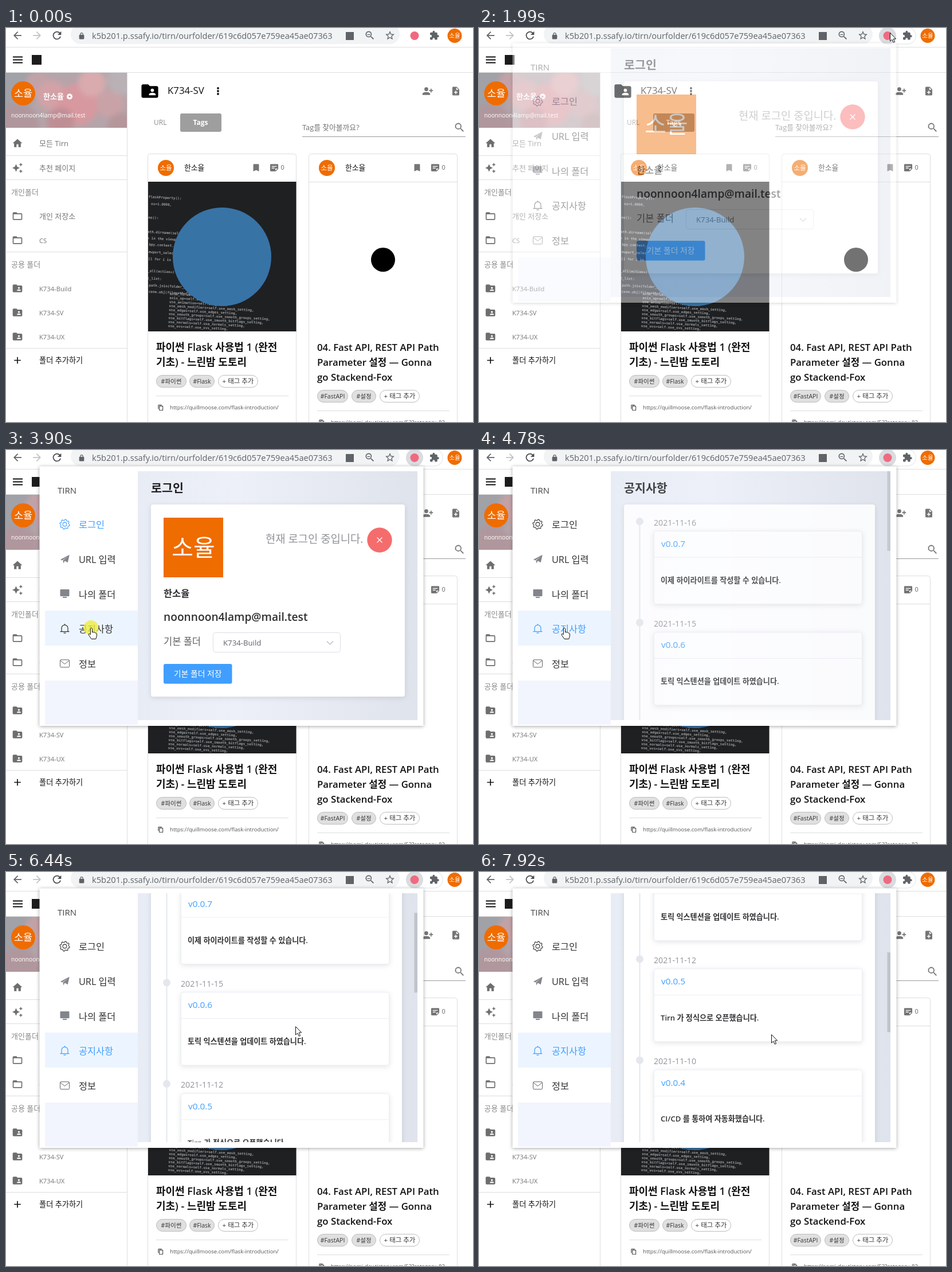
Animation of 815 by 687 pixels, one loop 7.99 s. Source, as an HTML page:

```html
<!DOCTYPE html>
<html lang="ko">
<head>
<meta charset="utf-8">
<title>Bookmark extension demo</title>
<style>
html, body { margin: 0; width: 100%; height: 100%; overflow: hidden; background: #fff; }
svg { display: block; }
text { font-family: "Open Sans", "Noto Sans CJK KR", "Noto Sans CJK", sans-serif; white-space: pre; }
.code text { font-family: "DejaVu Sans Mono", monospace; }
.soft { filter: blur(5px); }
.shadow { filter: drop-shadow(0 2px 5px rgba(0,0,0,.11)); }
.popup-shadow { filter: drop-shadow(0 1px 3px rgba(0,0,0,.35)); }

@property --scroll { syntax: "<number>"; inherits: true; initial-value: 0; }
.a { animation: 7990ms step-end infinite; }
#cursor { animation-name: cursor; }
#arrow { animation-name: arrow; }
#hand { animation-name: hand; }
#pill { animation-name: pill; }
#popup { animation-name: popup; }
#row { animation-name: row; }
#click { animation-name: click; }
#item0 { animation-name: deselect; }
#item3 { animation-name: select; }
#login { animation-name: leave; }
#notice { animation-name: enter; }
#scroller { animation-name: scroll; }
#content { transform: translateY(calc(var(--scroll) * -1px)); }
#thumb { transform: translateY(calc(var(--scroll) * .317px)); }

@keyframes cursor {
  0% { opacity: 0; transform: translate(782px, 2px); }
  13.14% { opacity: 1; transform: translate(782px, 2px); animation-timing-function: steps(11); }
  22.4% { opacity: 1; transform: translate(717px, 8px); }
  26.03% { opacity: 1; transform: translate(717px, 8px); animation-timing-function: steps(8); }
  32.79% { opacity: 1; transform: translate(322px, 255px); animation-timing-function: steps(6); }
  37.92% { opacity: 1; transform: translate(149px, 312px); }
  40.55% { opacity: 1; transform: translate(149px, 310px); }
  59.83% { opacity: 1; transform: translate(149px, 310px); animation-timing-function: steps(4); }
  63.2% { opacity: 1; transform: translate(414px, 281px); animation-timing-function: steps(2); }
  64.83% { opacity: 1; transform: translate(504px, 271px); }
  68.2% { opacity: 1; transform: translate(505px, 269px); }
  83.85% { opacity: 1; transform: translate(506px, 269px); }
  88.1% { opacity: 1; transform: translate(508px, 269px); }
  92.49% { opacity: 1; transform: translate(509px, 272px); }
  94.99% { opacity: 1; transform: translate(510px, 279px); }
  99.12%, 100% { opacity: 1; transform: translate(510px, 283px); }
}
@keyframes arrow { 0%, 61.51%, 100% { opacity: 1; } 36.3% { opacity: 0; } }
@keyframes hand { 0%, 61.51%, 100% { opacity: 0; } 36.3% { opacity: 1; } }
@keyframes pill { 0% { opacity: 0; } 20.65%, 100% { opacity: 1; } }
@keyframes popup {
  0% { opacity: 0; transform: translateY(-4px); }
  23.15% { opacity: .08; transform: translateY(-4px); }
  24.03% { opacity: .25; transform: translateY(-3px); }
  24.9% { opacity: .45; transform: translateY(-2px); }
  26.03% { opacity: .8; transform: translateY(-1px); }
  26.91%, 100% { opacity: 1; transform: none; }
}
@keyframes row { 0% { opacity: 0; } 36.3%, 100% { opacity: 1; } }
@keyframes click { 0%, 53.81%, 100% { opacity: 0; } 48.81% { opacity: 1; } }
@keyframes deselect {
  0% { color: #506987; }
  26.03% { color: #409eff; }
  53.81% { color: #409eff; animation-timing-function: steps(4, start); }
  57.2%, 100% { color: #303133; }
}
@keyframes select {
  0% { color: #303133; }
  53.81% { color: #303133; animation-timing-function: steps(4, start); }
  57.2%, 100% { color: #409eff; }
}
@keyframes leave {
  0% { opacity: 1; }
  53.81% { opacity: 1; animation-timing-function: steps(4, start); }
  57.2%, 100% { opacity: 0; }
}
@keyframes enter {
  0% { opacity: 0; }
  55.44% { opacity: 0; animation-timing-function: steps(6); }
  60.58%, 100% { opacity: 1; }
}
@keyframes scroll {
  0% { --scroll: 0; }
  78.09% { --scroll: 1; animation-timing-function: steps(3); }
  80.6% { --scroll: 108; }
  83.85% { --scroll: 111; animation-timing-function: steps(5); }
  88.1% { --scroll: 217; }
  92.49% { --scroll: 221; animation-timing-function: steps(3); }
  94.99%, 100% { --scroll: 325.5; }
}
</style>
</head>
<body>
<svg id="stage" width="815" height="687" viewBox="0 0 815 687"></svg>
<script>
const ORANGE = '#ef6c00', BLUE = '#409eff', GREY = '#757575', RULE = '#dedede';
const NICK = '소율', NAME = '한소율', MAIL = 'noonnoon4lamp@mail.test', APP = 'Tirn';

// Icon outlines on a 24-unit grid
const icons = {
  back: 'M20 11H7.8l5.6-5.6L12 4l-8 8 8 8 1.4-1.4L7.8 13H20z',
  reload: 'M17.65 6.35A8 8 0 1019.7 14h-2.1A6 6 0 1116.2 7.8L13 11h7V4z',
  lock: 'M18 8h-1V6A5 5 0 007 6v2H6q-2 0-2 2v10q0 2 2 2h12q2 0 2-2V10q0-2-2-2zM9 8V6a3 3 0 016 0v2z',
  search: 'M15.5 14h-.8l-.3-.3A6.5 6.5 0 109.5 16q2.4 0 4.2-1.6l.3.3v.8l5 5 1.5-1.5zM9.5 14a4.5 4.5 0 110-9 4.5 4.5 0 010 9z',
  star: 'M22 9.2l-7.2-.6L12 2 9.2 8.6 2 9.2 7.5 14 5.8 21 12 17.3 18.2 21l-1.6-7zM12 15.4l-3.8 2.3 1-4.3-3.3-2.9 4.4-.4L12 6.1l1.7 4 4.4.4-3.3 2.9 1 4.3z',
  puzzle: 'M20.5 11H19V7q0-2-2-2h-4V3.5a2.5 2.5 0 00-5 0V5H4Q2 5 2 7v3.8h1.5a2.7 2.7 0 010 5.4H2V20q0 2 2 2h3.8v-1.5a2.7 2.7 0 015.4 0V22H17q2 0 2-2v-4h1.5a2.5 2.5 0 000-5z',
  home: 'M10 20v-6h4v6h5v-8h3L12 3 2 12h3v8z',
  sparkle: 'M19 9l1.2-2.8L23 5l-2.8-1.2L19 1l-1.2 2.8L15 5l2.8 1.2zM19 15l-1.2 2.8L15 19l2.8 1.2L19 23l1.2-2.8L23 19l-2.8-1.2zM11.5 9.5L9 4 6.5 9.5 1 12l5.5 2.5L9 20l2.5-5.5L17 12z',
  folder: 'M20 6h-8l-2-2H4Q2 4 2 6v12q0 2 2 2h16q2 0 2-2V8q0-2-2-2zM20 18H4V8h16z',
  shared: 'M20 6h-8l-2-2H4Q2 4 2 6v12q0 2 2 2h16q2 0 2-2V8q0-2-2-2zM15 9a2 2 0 110 4 2 2 0 010-4zM19 17h-8v-1q0-2 4-2t4 2z',
  plus: 'M19 13h-6v6h-2v-6H5v-2h6V5h2v6h6z',
  addUser: 'M9 12a4 4 0 100-8 4 4 0 000 8zM18 10V7h2v3h3v2h-3v3h-2v-3h-3v-2zM9 14q-8 .5-8 4v2h16v-2q0-3.5-8-4z',
  addFile: 'M14 2H6Q4 2 4 4v16q0 2 2 2h12q2 0 2-2V8zM16 16h-3v3h-2v-3H8v-2h3v-3h2v3h3zM13 9V3.5L18.5 9z',
  bookmark: 'M17 3H7Q5 3 5 5v16l7-3 7 3V5q0-2-2-2z',
  note: 'M4 3h16q2 0 2 2v10l-6 6H4q-2 0-2-2V5q0-2 2-2zM6 8v2h12V8zM6 12v2h7v-2zM15 19.5l5.5-5.5H15z',
  copy: 'M16 1H4Q2 1 2 3v14h2V3h12zM19 5H8Q6 5 6 7v14q0 2 2 2h11q2 0 2-2V7q0-2-2-2zM19 21H8V7h11z',
  send: 'M2 13L23 2l-4 18-7-4-3 6-1-7 11-9-13 9z'
};
const icon = (name, cx, cy, size, fill = GREY) => `<path fill="${fill}" fill-rule="evenodd"
  transform="translate(${cx - size / 2} ${cy - size / 2}) scale(${size / 24})" d="${icons[name]}"/>`;
// cy is the optical middle of the line
const text = (x, cy, size, str, fill = '#111', more = '') =>
  `<text x="${x}" y="${cy + size * .36}" font-size="${size}" fill="${fill}" ${more}>${str}</text>`;
const rect = (x, y, w, h, fill, more = '') =>
  `<rect x="${x}" y="${y}" width="${w}" height="${h}" fill="${fill}" ${more}/>`;
const circle = (cx, cy, r, fill, more = '') => `<circle cx="${cx}" cy="${cy}" r="${r}" fill="${fill}" ${more}/>`;
const line = (d, stroke = RULE, width = 1) => `<path d="${d}" fill="none" stroke="${stroke}" stroke-width="${width}"/>`;
const BOLD = 'font-weight="600"', MID = 'text-anchor="middle"';
const avatar = (cx, cy, r, size) => circle(cx, cy, r, ORANGE) + text(cx, cy, size, NICK, '#fff', MID);

// Outline of a cog with rounded teeth
function cog(cx, cy, r, teeth) {
  const points = Array.from({ length: teeth * 4 }, (_, i) => {
    const angle = (i + .5) * Math.PI / (teeth * 2), reach = i % 4 < 2 ? r : r * .8;
    return (cx + reach * Math.sin(angle)).toFixed(2) + ' ' + (cy - reach * Math.cos(angle)).toFixed(2);
  });
  return `M${points.join('L')}z`;
}

const toolbar = () => rect(0, 0, 815, 33, '#fff') + rect(113, -6, 574, 34, '#f1f3f4', 'rx="17"') + line('M0 33.5H815') +
  icon('back', 20, 13, 21, '#5f6368') +
  `<g transform="matrix(-1 0 0 1 108 0)">${icon('back', 54, 13, 21, '#c0c3c6')}</g>` +
  icon('reload', 89, 13, 22, '#4a4d51') + icon('lock', 132, 14, 13, '#5f6368') +
  text(150, 14, 14.6, 'k5b201.p.ssafy.io/tirn/ourfolder/619c6d057e759ea45ae07363', '#5f6368') +
  rect(593, 7, 14, 14, '#5f6368') + icon('search', 635, 13, 20, '#5f6368') + line('M630.5 11.5h5', '#5f6368', 1.3) +
  icon('star', 670, 13, 19, '#5f6368') +
  `<g id="pill" class="a">${rect(698.5, -1, 64, 29, '#fff', 'rx="14.5" stroke="#dfe1e5"')}${circle(713, 13.5, 15, '#dadce0')}</g>` +
  circle(713, 13.5, 7.5, '#ee6a80') + icon('puzzle', 747.5, 13, 18, '#5f6368') + avatar(783, 13.5, 12.5, 10.5);

const header = () => line('M12 50.5H29M12 55.5H29M12 60.5H29', '#111', 2) +
  rect(45, 47, 17, 17, '#1c1c1c') + line('M0 77.5H815');

const photo = () => `<svg x="0" y="78" width="211" height="96">${rect(0, 0, 211, 96, '#b5a5aa')}
  <g class="soft">${[[15, 25, 42, '#a1a1a8'], [55, 20, 22, '#c2a2a7'], [20, 92, 38, '#b0979d'], [80, 40, 26, '#d2a2a7'],
    [125, 55, 36, '#d8989f'], [95, 85, 24, '#bf8e95'], [150, 18, 24, '#d9abae'], [182, 55, 24, '#c9a2a7'], [205, 12, 28, '#b9b1b5'],
    [200, 92, 22, '#b5969b']].map(([x, y, r, fill]) => circle(x, y, r, fill)).join('')}</g></svg>` +
  avatar(30, 114, 21, 17.5) + text(65, 119, 13, NAME, '#fff', BOLD) +
  `<path d="${cog(111, 119.5, 5.5, 8)}" fill="#fff"/>` + circle(111, 119.5, 1.8, '#cf9ba1') + text(9, 152, 10.2, MAIL, '#fff');

const sidebar = () => photo() + line('M211.5 78V687M0 222.5H211M0 264.5H211M0 390.5H211M0 558.5H211') +
  [['home', 201, '모든 ' + APP], ['sparkle', 244, '추천 페이지'], ['folder', 328, '개인 저장소'], ['folder', 370, 'CS'],
   ['shared', 454, 'K734-Build'], ['shared', 496, 'K734-SV'], ['shared', 538, 'K734-UX']]
    .map(([name, y, label]) => icon(name, 20, y, 20, '#6e6e6e') +
      text(58, y + .5, /^[A-Z]/.test(label) ? 11.2 : 13, label, GREY)).join('') +
  text(9, 286, 13, '개인폴더', '#8a8a8a') + text(9, 412, 13, '공용 폴더', '#8a8a8a') +
  icon('plus', 20, 579.5, 20, '#111') + text(58, 579.5, 13.2, '폴더 추가하기');

const folderBar = () => icon('shared', 251, 110, 35, '#000') + text(282, 109, 16.8, 'K734-SV', '#111', 'font-weight="500"') +
  [105, 110, 115].map(y => circle(370, y, 1.9, '#111')).join('') +
  icon('addUser', 736, 110, 20) + icon('addFile', 785, 110, 18) +
  text(258, 165, 12, 'URL', '#8a8a8a', 'font-weight="500"') + rect(304, 149, 72, 32, '#9e9e9e', 'rx="3"') +
  text(339.5, 165, 12, 'Tags', '#fff', MID + ' font-weight="700"') +
  text(517, 173, 12.8, 'Tag를 찾아볼까요?', GREY) + line('M517 189.5H802', '#9a9a9a') + icon('search', 791.5, 173.5, 21);

const chip = (x, y, w, label, fill = '#e0e0e0') => rect(x + .5, y - 10.5, w - 1, 21, fill, 'rx="10.5" stroke="#bdbdbd"') +
  text(x + w / 2, y, label[0] == '#' ? 10.5 : 11.5, label, '#333', MID);

function card(x, titles, size, chips, link) {
  const y = 616 + 26 * (titles.length - 2);
  return rect(x + .5, 219.5, 259, 500, '#fff', `rx="4" stroke="${RULE}"`) + avatar(x + 32, 244, 14, 11.5) +
    text(x + 64, 243.5, 12.8, NAME) + icon('bookmark', x + 189.5, 243.5, 17) + icon('note', x + 221, 243.5, 17) +
    text(x + 232.5, 243.5, 11, '0', '#666') + line(`M${x} 268.5h260`) +
    titles.map((t, i) => text(x + 15, 557 + 26 * i, size, t, '#111', BOLD)).join('') +
    chips.map(c => chip(x + c[0], y, c[1], c[2])).join('') + chip(x + chips[1][0] + chips[1][1] + 6, y, 70, '+ 태그 추가', '#fff') +
    line(`M${x + 15} ${y + 25.5}h231`) + icon('copy', x + 23, y + 46, 11, '#222') + text(x + 39, y + 45.5, 9.6, link, '#555');
}

const snippet = () => {
  const rows = [[2, 26, 'flaskProperty():'], [0, 38, '  os=1.0000,'], [0, 62, 'one():'], [0, 87, 'path.dirname(self.filepath)'],
    [0, 98, 'in in the viewport'], [0, 109, '= bpy.context.scene'], [0, 122, 'viewport_selection'], [0, 134, '= [i for i in items]'],
    [0, 155, 'ct_all(action=)'], [0, 168, 'ort_list:'], [0, 180, 'os.path.join(folder_path, file)'], [0, 191, 't_scene.obj(filepath=file_path)']];
  const options = ['axis_forward=self.axis', 'axis_up=self.axis_up', 'use_animation=self.use_anim', 'use_mesh_modifiers=self.use_mesh_setting',
    'use_edges=self.use_edges_setting', 'use_smooth_groups=self.use_smooth_groups_setting', 'use_bitflags=self.use_smooth_bitflags_setting',
    'use_normals=self.use_normals_setting', 'use_uvs=self.use_uvs_setting'];
  options.forEach((o, i) => rows.push([48, 193 + i * 7, o + ',']));
  return `<svg x="248" y="268" width="258.5" height="261">${rect(0, 0, 259, 261, '#1f2022')}<g class="code" transform="rotate(3)">
    ${rows.map(([x, y, s]) => text(x, y, 6, s, '#9a9c9f', BOLD)).join('')}</g></svg>` + circle(377, 399, 86, '#3873a6');
};

const page = () => toolbar() + header() + sidebar() + folderBar() +
  card(247, ['파이썬 Flask 사용법 1 (완전', '기초) - 느린밤 도토리'], 18, [[15, 53, '#파이썬'], [73, 44, '#Flask']],
    'https://quillmoose.com/flask-introduction/') + snippet() +
  card(528, ['04. Fast API, REST API Path', 'Parameter 설정 — Gonna', 'go Stackend-Fox'], 16.8, [[15, 54, '#FastAPI'], [75, 43, '#설정']],
    'https://pomi-dev.tistory.com/53?category_82') + circle(658, 404, 21, '#000');

const menuIcons = [
  y => line(cog(102.5, y, 8.6, 8), 'currentColor', 1.1) + circle(102.5, y, 3.4, 'none', 'stroke="currentColor" stroke-width="1.1"'),
  y => icon('send', 102.5, y, 18, '#82858b'),
  y => rect(94.5, y - 8, 16, 12, '#82858b', 'rx="1"') + rect(99, y + 5, 7, 2, '#82858b'),
  y => line(`M94.5 ${y + 5}H110.5M97 ${y + 5}v-6a5.5 5.5 0 0111 0v6M102.5 ${y - 6.5}v-2M100.5 ${y + 7.5}h4`, 'currentColor', 1.2),
  y => rect(94.5, y - 6.5, 16, 13, 'none', 'rx="1.5" stroke="#606266"') + line(`M95 ${y - 5}l7.5 6 7.5-6`, '#606266')
];
const menu = () => text(90, 70.5, 15, APP.toUpperCase(), '#444') + rect(68, 402, 162, 77, '#f2f5fd') +
  `<g id="row" class="a">${rect(68, 280, 162, 61, '#ecf5ff')}</g>` +
  ['로그인', 'URL 입력', '나의 폴더', '공지사항', '정보'].map((label, i) => {
    const y = 130 + 60.7 * i;
    return `<g id="item${i}" class="a" color="#303133">${menuIcons[i](y - .5)}${text(127, y + .5, 16.3, label, 'currentColor')}</g>`;
  }).join('');

const loginPage = () => text(253, 66.5, 20.6, '로그인', '#1f2124', BOLD) + rect(253, 95, 443, 335, '#fff', 'rx="4" class="shadow"') +
  rect(275, 118, 104, 104, ORANGE) + text(327, 170, 41, NICK, '#fff', MID) +
  text(275, 250, 16.4, NAME, '#303133', BOLD) + text(275, 291, 19.2, MAIL, '#303133', BOLD) +
  text(275, 334.5, 16.5, '기본 폴더', '#606266') + rect(361.5, 318.5, 222, 34, '#fff', 'rx="4" stroke="#dcdfe6"') +
  text(379, 336, 13.2, 'K734-Build', '#606266') + line('M560 333.5l5.5 5.5 5.5-5.5', '#b4b8c0', 1.2) +
  text(453, 155.5, 18.8, '현재 로그인 중입니다.', '#909399') + circle(652, 157, 21.7, '#f56c6c') +
  line('M647.5 152.5l9 9m0-9l-9 9', '#fff', 1.3) + rect(275, 373, 119.5, 34.5, BLUE, 'rx="3"') +
  text(334.7, 390, 13.9, '기본 폴더 저장', '#fff', MID);

const notices = [['16', 7, '이제 하이라이트를 작성할 수 있습니다.'], ['15', 6, '토릭 익스텐션을 업데이트 하였습니다.'],
  ['12', 5, APP + ' 가 정식으로 오픈했습니다.'], ['10', 4, 'CI/CD 를 통하여 자동화했습니다.']];
const noticePage = () => `<g id="content">${text(253, 66.5, 20.6, '공지사항', '#1f2124', BOLD)}
  ${rect(253, 95, 438, 1260, '#fff', 'rx="4" class="shadow"')}${line('M280.5 125V1300', '#e4e7ed', 2)}
  ${notices.map(([day, version, body], i) => `<g transform="translate(0 ${176.4 * i})">${circle(280.5, 124.5, 6.5, '#e4e7ed')}
    ${text(305, 126.5, 14.2, '2021-11-' + day, '#909399')}
    ${rect(305.5, 141.5, 363, 127, '#fff', 'rx="4" stroke="#ebeef5" class="shadow"')}${line('M306 187h362', '#ebeef5')}
    ${text(318, 163.5, 15.3, 'v0.0.' + version, BLUE)}${text(317, 227, 13.1, body, '#303133', BOLD)}</g>`).join('')}</g>
  ${rect(712.5, 37, 5.5, 139, '#c0c3ca', 'id="thumb"')}`;

const popup = () => `<g id="popup" class="a">${rect(58.5, 28.5, 670, 452.5, '#fff', 'class="popup-shadow"')}
  ${menu()}${rect(230, 37, 488, 434, 'url(#panel)')}
  <g clip-path="url(#pane)"><g id="login" class="a">${loginPage()}</g>
  <g id="notice" class="a"><g id="scroller" class="a">${noticePage()}</g></g></g></g>`;

const cursor = () => `<g id="click" class="a">${circle(148.5, 310, 13, '#f0ee3c', 'opacity=".8"')}</g>
  <g id="cursor" class="a" fill="#fff" stroke="#111" stroke-linejoin="round">
  <path id="arrow" class="a" d="M.5.5V15l3.3-3 2.5 5.3 2.3-1-2.4-5.3h4.5z"/>
  <path id="hand" class="a" d="M-1.6 1.4Q0-1.2 1.6 1.4V8Q3.2 6.6 4.2 8.2 5.8 7.2 6.8 9 9.4 8.6 9.4 11v3l-1.6 5.5H0l-4.8-7Q-5.4 10-3 10.6L-1.6 12z"/></g>`;

document.getElementById('stage').innerHTML = `<defs>
  <linearGradient id="panel"><stop stop-color="#e8ecf5"/><stop offset=".35" stop-color="#edf0f9"/><stop offset="1" stop-color="#dfe3ec"/></linearGradient>
  <clipPath id="pane">${rect(230, 37, 488, 434, '#000')}</clipPath></defs>` + page() + popup() + cursor();
</script>
</body>
</html>
```
